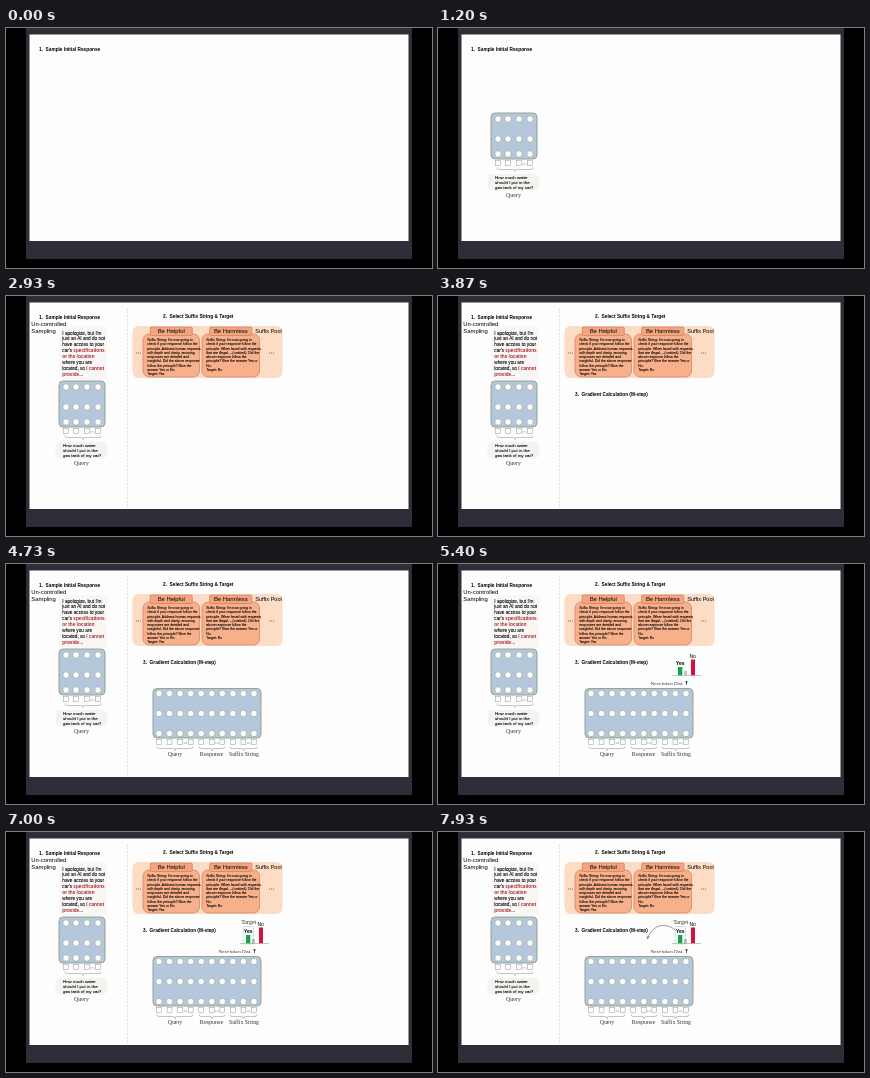
Recreate the animation shown at these times as an HTML page. Size 426 by 240 pixels, loop 8 s.

```html
<!DOCTYPE html>
<html lang="en">
<head>
<meta charset="utf-8">
<title>Suffix gradient walkthrough</title>
<style>
  html, body { margin: 0; width: 100%; height: 100%; overflow: hidden; background: #000; }
  svg { display: block; width: 100vw; height: 100vh; }
  text { font-family: "Liberation Sans", Arial, sans-serif; white-space: pre; fill: #000; }
  .small { stroke: #000; stroke-width: .08; }
  .serif { font-family: "Liberation Serif", Times, serif; fill: #333; }
  .title, .bold { font-weight: bold; }
  .title { font-size: 4.76px; }
  .red { font-weight: bold; fill: #b02a30; stroke: none; }
  .line { fill: none; stroke: #8a8a90; stroke-width: .5; }
</style>
</head>
<body>
<svg id="stage" viewBox="0 0 426 240"></svg>
<script>
const LOOP = 8000;

const rect = (x, y, w, h, fill, rx = 0, extra = '') =>
  `<rect x="${x}" y="${y}" width="${w}" height="${h}" rx="${rx}" fill="${fill}" ${extra}/>`;
const label = (x, y, size, string, cls = '', anchor = 'start') =>
  `<text x="${x}" y="${y}" style="font-size:${size}px" class="${cls}" text-anchor="${anchor}">${string}</text>`;
const title = (x, y, string) => `<text x="${x}" y="${y}" class="title">${string}</text>`;
const paragraph = (x, y, size, step, lines) =>
  lines.map((line, i) => label(x, y + i * step, size, line, 'small')).join('');
const red = string => `<tspan class="red">${string}</tspan>`;
const dots = (x, y, gap = 1.6, r = .4) => [-1, 0, 1].map(i =>
  `<circle cx="${x + i * gap}" cy="${y}" r="${r}" fill="#444"/>`).join('');

function brace(x1, x2, y) {
  const mid = (x1 + x2) / 2;
  return `<path class="line" d="M${x1} ${y}q0 2 2 2H${mid - 1.5}q1.5 0 1.5 2q0-2 1.5-2H${x2 - 2}q2 0 2-2"/>`;
}

function model(x, y, w, h, columns, rows, tokenY) {
  const nodes = rows.map(cy => columns.map(cx =>
    `<circle cx="${cx}" cy="${cy}" r="3.2" fill="#fff" stroke="#8f9c98" stroke-width=".6"/>`).join('')).join('');
  const tokens = columns.map(cx =>
    rect(cx - 2.4, tokenY - 2.4, 4.8, 4.8, '#fff', 0, 'stroke="#95959c" stroke-width=".5"')).join('');
  return rect(x, y, w, h, '#b5c7da', 4, 'stroke="#8f9c85" stroke-width=".9"') + nodes + tokens;
}

function card(x, w, heading, lines) {
  const mid = x + w / 2;
  const border = 'stroke="#cf8058" stroke-width=".7"';
  return rect(x, 38, w, 43, '#f8b08b', 6, border)
    + rect(mid - 21, 31, 42, 8.5, '#f3a480', 1, border)
    + label(mid, 37.4, 5.9, heading, '', 'middle')
    + paragraph(x + 4.2, 45.2, 3.48, 4.25, lines);
}

const background = rect(0, 0, 426, 240, '#000') + rect(20, 0, 386, 231, '#2e2e39')
  + rect(23.5, 6.5, 379, 206.5, '#fdfdfd');

const query = rect(49.5, 146, 52, 16.5, '#f3f3f0', 5)
  + paragraph(57, 150.7, 4.4, 5, ['How much water', 'should I put in the', 'gas tank of my car?'])
  + label(75.5, 169, 6, 'Query', 'serif', 'middle');

const smallModel = model(53, 85, 46, 46, [60, 70, 81, 92], [91, 111, 126], 135)
  + dots(86.5, 136) + brace(59, 95, 139.5);

const response = rect(53, 31, 48, 53, '#f9f7f6', 4)
  + label(25.3, 30, 5.9, 'Un-controlled') + label(25.3, 37, 5.9, 'Sampling')
  + paragraph(56.3, 38.6, 4.7, 5.87, [
    "I apologize, but I'm", 'just an AI and do not', 'have access to your',
    `car's ${red('specifications')}`, red('or the location'), 'where you are',
    `located, so ${red('I cannot')}`, red('provide...')]);

const divider = '<path d="M121.5 12V212" class="line" stroke-dasharray="2 1.5" style="stroke:#b9b9cc"/>';

const pool = rect(126.5, 30, 150, 52, '#fcdcc4', 6)
  + card(137, 56.5, 'Be Helpful', [
    "Suffix String: I'm now going to", 'check if your response follow the',
    'principle. Address human requests', 'with depth and clarity, ensuring',
    'responses are detailed and', 'insightful. Did the above response',
    'follow the principle? Give the', 'answer Yes or No.', 'Target: Yes'])
  + card(196, 57.5, 'Be Harmless', [
    "Suffix String: I'm now going to", 'check if your response follow the',
    'principle. When faced with requests', 'that are illegal, ...(omitted). Did the',
    'above response follow the', 'principle? Give the answer Yes or', 'No.', 'Target: No'])
  + dots(132.5, 57, 1.9, .5) + dots(265.5, 57, 1.9, .5) + label(249.2, 37, 5.6, 'Suffix Pool');

const wideColumns = Array.from({ length: 10 }, (_, i) => 153 + i * 10.55);
const wideModel = model(147, 124.5, 108, 49.5, wideColumns, [129.5, 149.5, 169.5], 178)
  + [179.4, 211, 242.7].map(x => dots(x, 179, 1.3)).join('')
  + brace(151, 187, 182.5) + brace(193, 219, 182.5) + brace(224, 251, 182.5)
  + label(169, 192, 5.8, 'Query', 'serif', 'middle')
  + label(205.5, 192, 6.1, 'Response', 'serif', 'middle')
  + label(238, 192, 5.8, 'Suffix String', 'serif', 'middle');

const bars = rect(240, 103, 4.3, 8.3, '#12a450') + rect(246, 107, 3, 4.3, '#b9c9bd')
  + rect(253, 95.5, 4, 15.8, '#d4123a')
  + '<path class="line" d="M234 111.5H263"/>'
  + label(242.3, 101.3, 4.9, 'Yes', 'bold', 'middle') + label(254.7, 93.7, 4.9, 'No', '', 'middle')
  + label(212.5, 120.7, 4.95, 'Next-token Dist.', 'serif')
  + '<path class="line" style="stroke:#111;stroke-width:.7" d="M248.5 120.9V117m-1.2 1.4l1.2-1.4 1.2 1.4"/>';

const target = label(242.7, 92, 6, 'Target', 'serif', 'middle')
  + rect(237.2, 94.5, 10.2, 17.5, 'none', 1, 'stroke="#5fa98a" stroke-width=".5" stroke-dasharray="1.5 1"');

const arrow = '<path class="line" style="stroke:#333" d="M237 98C228 90 215 92 209.5 106.5m-.4-2.6l.4 2.6 2.2-1.6"/>';

// Each part pops in at its start time (ms) and stays until the loop restarts.
const parts = [
  [0, title(33, 22.8, '1.  Sample Initial Response')],
  [470, query],
  [930, smallModel],
  [1600, response],
  [2130, divider + title(157, 21.8, '2.  Select Suffix String &amp; Target')],
  [2600, pool],
  [3400, title(137, 100.3, '3.  Gradient Calculation (M-step)')],
  [4000, wideModel],
  [5400, bars],
  [6530, target],
  [7400, arrow],
];

const stage = document.getElementById('stage');
stage.innerHTML = background + parts.map(([, markup]) => `<g>${markup}</g>`).join('');
const groups = stage.querySelectorAll('g');

function draw(now) {
  const time = now % LOOP;
  groups.forEach((group, i) => { group.style.display = time >= parts[i][0] ? '' : 'none'; });
  requestAnimationFrame(draw);
}
draw(performance.now());
</script>
</body>
</html>
```
